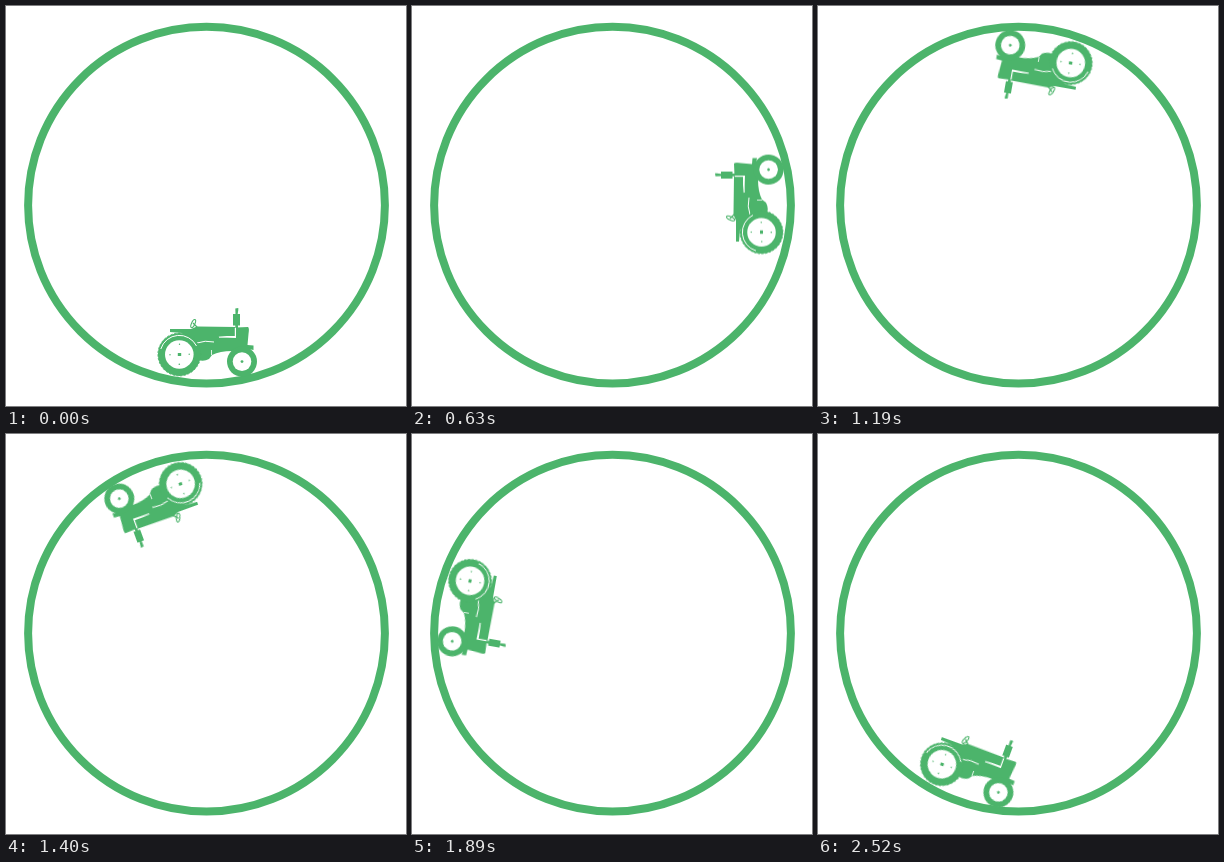
These frames come from a looping animation (400 px wide and 400 px high, 2.59 s). An HTML page:

```html
<!DOCTYPE html>
<html lang="en">
<head>
<meta charset="utf-8">
<title>Tractor loop</title>
<style>
  html, body { margin: 0; width: 100%; height: 100%; overflow: hidden; background: #fff; }
  svg { display: block; width: 100vw; height: 100vh; }
  .ink { fill: #4cb46b; }
  .gap { fill: #fff; }
  .line { fill: none; stroke: #4cb46b; }
  .cut { fill: none; stroke: #fff; }
  .tractor {
    transform-origin: 200.3px 199.3px;
    animation: drive 2590ms -2ms infinite;
  }
  /* 70 ms ticks of 10 degrees, with a short stall at 200 and at 280 degrees */
  @keyframes drive {
    0% { transform: rotate(0deg); animation-timing-function: steps(21, jump-none); }
    56.7568% { transform: rotate(-200deg); animation-timing-function: steps(9, jump-none); }
    81.0811% { transform: rotate(-280deg); animation-timing-function: steps(7, jump-none); }
    100% { transform: rotate(-340deg); }
  }
</style>
</head>
<body>
<svg viewBox="0 0 400 400">
  <circle class="line" cx="200.5" cy="199.2" r="178.4" stroke-width="8"/>
  <g class="tractor">
    <!-- platform and steering wheel -->
    <path class="ink" d="M164 323H185L191 320.5L195 323V334H184L176 327L164 326Z"/>
    <ellipse class="line" cx="187.2" cy="317.6" rx="1.7" ry="4.4" stroke-width="1.1" transform="rotate(24 187.2 317.6)"/>
    <path class="line" d="M187 317L192 322" stroke-width="1.2"/>

    <!-- hood, engine and grille -->
    <path class="ink" d="M189 322L192 320.5L229 321V330H212L230 332V321.5L242 321Q243.500 322 242.500 328L241.500 339L247.500 339.500V344L240 342.500L226 345Q214 345 206 349L203 353Q198 356 192 354L188 335Z"/>
    <path class="cut" d="M213 331.200H229.300V322" stroke-width="1"/>
    <path class="cut" d="M191 337Q199 334 208 336" stroke-width="1"/>
    <path class="cut" d="M205.500 344V349" stroke-width=".8"/>

    <!-- exhaust -->
    <path class="ink" d="M229.300 302.500L232.300 302V304L231.700 308H234V319.500H232V322H229.300V319.500H227V308H229.500Z"/>

    <!-- rear wheel and fender -->
    <circle class="ink" cx="173.300" cy="348.500" r="21.400"/>
    <circle class="line" cx="173.300" cy="348.500" r="21.400" stroke-width=".9" stroke-dasharray="2.2 1.600"/>
    <path class="cut" d="M154.800 343A19.300 19.300 0 0 1 190.500 340" stroke-width="1"/>
    <circle class="gap" cx="173.300" cy="348.500" r="14.300"/>
    <rect class="ink" x="171.800" y="347" width="3.400" height="3"/>
    <g class="ink">
      <circle cx="173.500" cy="338.300" r=".7"/>
      <circle cx="164" cy="348.800" r=".7"/>
      <circle cx="183.200" cy="348.300" r=".7"/>
      <circle cx="173.300" cy="358.300" r=".8"/>
    </g>

    <!-- front wheel -->
    <circle class="ink" cx="236" cy="355.600" r="15"/>
    <circle class="gap" cx="236" cy="355.600" r="9.300"/>
    <circle class="ink" cx="236" cy="355.600" r="1.400"/>
  </g>
</svg>
</body>
</html>
```
